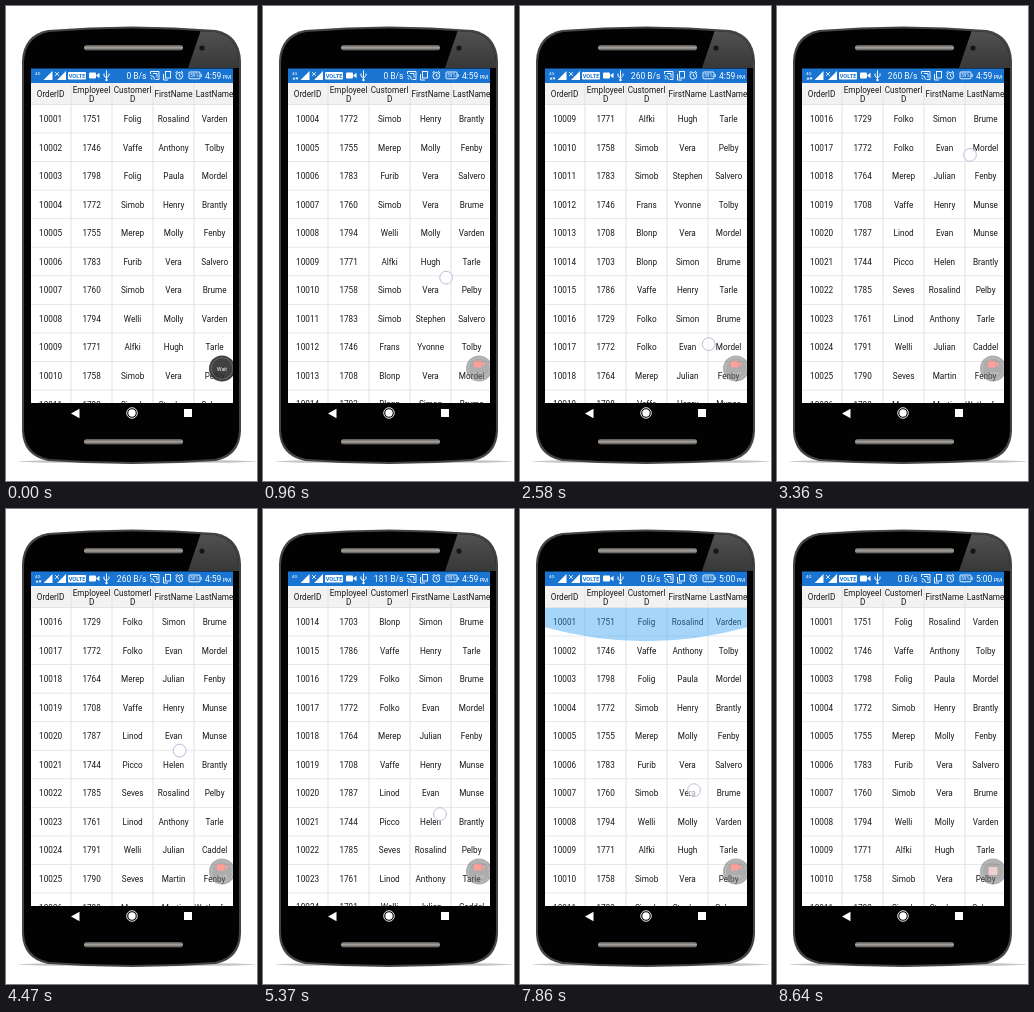
Animation, 251 px wide and 475 px high, one loop 8.7 s. Source, as an HTML page:

```html
<!DOCTYPE html>
<html lang="en">
<head>
<meta charset="utf-8">
<title>Grid scrolling line by line</title>
<style>
  html, body { margin: 0; width: 100%; height: 100%; overflow: hidden; background: #fff; }
  svg { display: block; width: 251px; height: 475px; }
  text { font-family: Roboto, sans-serif; }
  .cell { font-size: 8.2px; text-anchor: middle; fill: #181818; }
  .bar { font-size: 8.5px; fill: #fff; }
  .line { fill: #e2e2e2; }
</style>
</head>
<body>
<svg viewBox="0 0 251 475">
  <defs>
    <linearGradient id="gloss" x2="0" y2="1">
      <stop offset="0" stop-color="#565656"/>
      <stop offset="1" stop-color="#383838"/>
    </linearGradient>
    <linearGradient id="metal" x2="0" y2="1">
      <stop offset="0" stop-color="#57534f"/>
      <stop offset=".5" stop-color="#aaa5a0"/>
      <stop offset="1" stop-color="#4a4744"/>
    </linearGradient>
    <clipPath id="view"><rect x="25" y="99" width="202" height="298"/></clipPath>
    <clipPath id="screen"><rect x="25" y="62" width="202" height="335"/></clipPath>
    <clipPath id="face"><path d="M18 56Q19 31 43 26Q126 19 209 26Q232 31 233 56V424Q232 448 209 453Q126 459 43 453Q19 448 18 424Z"/></clipPath>
  </defs>

  <!-- phone -->
  <ellipse cx="131" cy="455.5" rx="119" ry="1.6" fill="#c4c4c4"/>
  <path fill="#444" d="M16 55Q17 29 42 24Q126 17 210 24Q234 29 235 55V425Q234 450 210 455Q126 461 42 455Q17 450 16 425Z"/>
  <g clip-path="url(#face)">
    <rect x="16" y="18" width="220" height="442" fill="#020202"/>
    <path fill="url(#gloss)" d="M197 18H236V62H182Z"/>
  </g>
  <rect x="78" y="39" width="99" height="5.5" rx="2.7" fill="url(#metal)"/>
  <rect x="78" y="433" width="99" height="5.5" rx="2.7" fill="url(#metal)"/>
  <circle cx="196" cy="42" r="2.6" fill="#151515"/>

  <!-- navigation bar -->
  <g fill="#fff">
    <path d="M65 407.5L73.5 402.8V412.2Z"/>
    <circle cx="126" cy="407" r="5.3" fill="none" stroke="#fff" stroke-width=".9"/>
    <circle cx="126" cy="407" r="3.7"/>
    <rect x="178" y="403" width="8" height="8"/>
  </g>

  <!-- table -->
  <rect x="25" y="99" width="202" height="298" fill="#fff"/>
  <g clip-path="url(#view)"><g id="rows"></g></g>
  <rect x="25" y="77" width="202" height="22" fill="#f2f2f2"/>
  <g id="head" clip-path="url(#screen)"></g>
  <path id="glow" fill="#2a9df4" clip-path="url(#view)"/>

  <!-- status bar -->
  <rect x="25" y="62.5" width="202" height="14.5" fill="#1975d1"/>
  <g fill="#fff">
    <text x="29" y="69" font-size="4.4">4G</text>
    <path id="data" d="M29.5 73.5L31 71L32.5 73.5ZM32.5 71.5H35.5L34 74Z"/>
    <path d="M37.5 74L46.5 65V74ZM51 74L60 65V74Z"/>
    <path d="M49 66L53 70M53 66L49 70" stroke="#fff" stroke-width=".8"/>
    <rect x="62" y="66" width="18" height="7.5" rx="1"/>
    <text x="71" y="71.8" font-size="5.6" font-weight="700" text-anchor="middle" fill="#1975d1">VOLTE</text>
    <rect x="83" y="66.5" width="7" height="6" rx="1"/>
    <path d="M90 69.5L93.5 66.7V72.3Z"/>
    <path d="M100.5 64.5V74.5M98 67.5V70L100.5 72L103 69.5V67.5" fill="none" stroke="#fff" stroke-width="1"/>
    <circle cx="100.5" cy="74" r="1.2"/>
    <g fill="none" stroke="#fff" stroke-width=".9">
      <path d="M144.5 68V65.5H153V73.5H149.5M144.5 69.5A4 4 0 0 1 148.5 73.5M144.5 72A1.5 1.5 0 0 1 146 73.5"/>
      <path d="M147 67.5H151V71.5"/>
      <rect x="159.5" y="65.5" width="5" height="6.5"/>
      <path d="M157.5 68V74H162"/>
      <circle cx="173.3" cy="69.8" r="3.4"/>
      <path d="M173.3 67.8V70L174.8 71M169.5 67L171.5 65M177 67L175 65"/>
      <rect x="183" y="66" width="11" height="6.8" rx="1"/>
      <path d="M195.2 68V71"/>
    </g>
    <text x="188.5" y="71.2" font-size="4.6" text-anchor="middle">59%</text>
  </g>
  <text id="speed" class="bar" x="140.5" y="72.5" text-anchor="end"></text>
  <text class="bar" x="199" y="72.5"><tspan id="clock"></tspan><tspan font-size="5.8" dx="1">PM</tspan></text>

  <!-- recorder badge -->
  <g id="badge" clip-path="url(#screen)">
    <circle id="disc" cx="216" cy="362.5" r="13"/>
    <circle cx="216" cy="362.5" r="10.8" fill="none" stroke="#fff" stroke-opacity=".3" stroke-width=".7"/>
    <text id="wait" x="216" y="364.5" font-size="5" text-anchor="middle" fill="#fff">Wait</text>
    <g id="rec">
      <path fill="#ff4f48" d="M211 355H218.5V361.5H211ZM218.5 358.2L221.5 355.8V360.8Z"/>
      <text x="216" y="369" font-size="4.4" text-anchor="middle" fill="#ddd" opacity=".6">00:09</text>
    </g>
    <rect id="stop" x="211.5" y="358" width="9" height="8" rx="1" fill="#e2a9a6"/>
  </g>

  <circle id="touch" r="6.4" fill="#fff" fill-opacity=".6" stroke="#bdbddb"/>
</svg>

<script>
const LOOP = 8700, ROW = 28.55, TOP = 99, COL = 41;
const $ = id => document.getElementById(id);

const records = `1751 Folig Rosalind Varden
1746 Vaffe Anthony Tolby
1798 Folig Paula Mordel
1772 Simob Henry Brantly
1755 Merep Molly Fenby
1783 Furib Vera Salvero
1760 Simob Vera Brume
1794 Welli Molly Varden
1771 Alfki Hugh Tarle
1758 Simob Vera Pelby
1783 Simob Stephen Salvero
1746 Frans Yvonne Tolby
1708 Blonp Vera Mordel
1703 Blonp Simon Brume
1786 Vaffe Henry Tarle
1729 Folko Simon Brume
1772 Folko Evan Mordel
1764 Merep Julian Fenby
1708 Vaffe Henry Munse
1787 Linod Evan Munse
1744 Picco Helen Brantly
1785 Seves Rosalind Pelby
1761 Linod Anthony Tarle
1791 Welli Julian Caddel
1790 Seves Martin Fenby
1788 Merep Martin Wetherford
1767 Alfki Helen Tarle
1752 Frans Molly Munse`.split("\n").map((r, i) => [10001 + i, ...r.split(" ")]);

const cell = (s, col, y) => `<text class="cell" x="${44.6 + col * COL}" y="${y}">${s}</text>`;
const rule = (x, y, w, h) => `<rect class="line" x="${x}" y="${y}" width="${w}" height="${h}"/>`;
const columns = (y, h) => [1, 2, 3, 4].map(c => rule(23.5 + c * COL, y, 1, h)).join("");

$("rows").innerHTML = records.map((r, i) => {
  const y = TOP + i * ROW;
  return r.map((s, c) => cell(s, c, y + 17)).join("") + rule(25, y + ROW - .9, 202, .8);
}).join("") + columns(TOP, records.length * ROW);

$("head").innerHTML = columns(77, 22) + rule(25, 98.2, 202, .8) +
  cell("OrderID", 0, 91) + cell("EmployeeI", 1, 87) + cell("D", 1, 96) +
  cell("CustomerI", 2, 87) + cell("D", 2, 96) +
  cell("FirstName", 3, 91) + cell("LastName", 4, 91);

// Each drag is a list of [time, x, y].
const drags = [
  [[150, 180, 346], [1710, 186, 203], [2150, 189, 139]],
  [[2450, 188, 370], [3360, 193, 149], [3700, 195, 112]],
  [[4050, 172, 212], [5370, 177, 305], [5700, 178, 340]],
  [[5850, 176, 150], [6400, 180, 290]],
  [[6560, 180, 143], [6930, 183, 254], [7240, 185, 343]],
  [[7330, 172, 180], [7860, 174, 281], [8180, 175, 325]]
];

const clamp = (v, a = 0, b = 1) => Math.min(b, Math.max(a, v));

function along(points, t) {
  let i = 1;
  while (i < points.length - 1 && t > points[i][0]) i++;
  const [a, b] = [points[i - 1], points[i]];
  const k = clamp((t - a[0]) / (b[0] - a[0]));
  return [a[1] + (b[1] - a[1]) * k, a[2] + (b[2] - a[2]) * k];
}

function gesture(t) {
  let scroll = 0, pull = 0, finger = null;
  for (const d of drags) {
    if (t < d[0][0]) break;
    const p = along(d, t);
    const raw = scroll - (p[1] - d[0][2]) / ROW;
    scroll = Math.max(0, raw);
    pull = Math.max(0, -raw) * ROW;
    if (t < d[d.length - 1][0]) finger = p;
  }
  return { scroll, pull, finger };
}

const at = (t, steps) => steps.reduce((v, [from, s]) => t >= from ? s : v, "");
const show = (id, on) => $(id).setAttribute("visibility", on ? "visible" : "hidden");

function draw(t) {
  const { scroll, pull, finger } = gesture(t);
  $("rows").setAttribute("transform", `translate(0 ${-Math.round(scroll) * ROW})`);

  show("touch", finger);
  if (finger) {
    $("touch").setAttribute("cx", finger[0]);
    $("touch").setAttribute("cy", finger[1]);
  }

  const fade = t > 7300 ? 1 - clamp((t - 8180) / 220) : 0;
  const h = 36 * (1 - Math.exp(-pull / 40)) * (.4 + .6 * fade);
  const edge = TOP + .57 * h;
  $("glow").setAttribute("d", `M24 ${TOP}H228V${edge}Q126 ${TOP + 1.43 * h} 24 ${edge}Z`);
  $("glow").setAttribute("opacity", .42 * fade * clamp(pull / 50));

  $("speed").textContent = at(t, [[0, "0 B/s"], [2300, "260 B/s"], [4600, "181 B/s"], [7320, "0 B/s"]]);
  $("clock").textContent = at(t, [[0, "4:59"], [6200, "5:00"]]);
  show("data", t > 900 && t < 4600);

  const calm = clamp((t - 30) / 400);
  const tone = Math.round(45 + 60 * calm);
  $("disc").setAttribute("fill", `rgb(${tone},${tone},${tone})`);
  $("badge").setAttribute("opacity", .9 - .36 * calm);
  show("wait", t < 400);
  show("rec", t >= 400 && t < 8550);
  show("stop", t >= 8550);
}

function tick() {
  draw(performance.now() % LOOP);
  requestAnimationFrame(tick);
}
tick();
</script>
</body>
</html>
```
